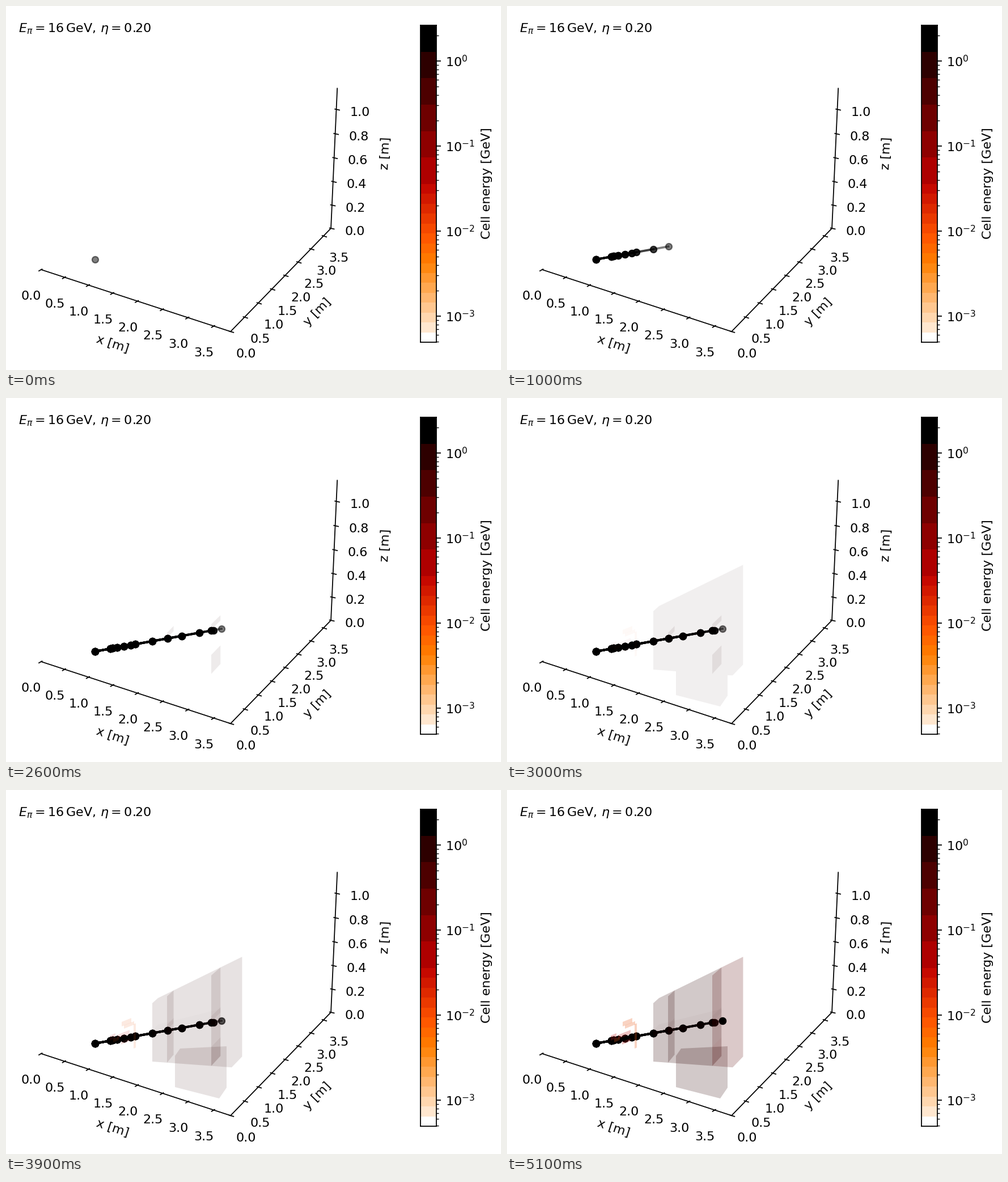
Animation, 873 px wide and 642 px high, one loop 6.1 s. Source, as a matplotlib script:

```python
import numpy as np
import matplotlib.pyplot as plt
from matplotlib.animation import FuncAnimation
from matplotlib.patches import Polygon

W, H, DPI = 873, 642, 160
FRAMES, STEP_MS = 61, 100

plt.rcParams["font.family"] = "DejaVu Sans"
plt.rcParams["font.size"] = 10
plt.rcParams["mathtext.fontset"] = "dejavusans"

fig = plt.figure(figsize=(W / DPI, H / DPI), dpi=DPI, facecolor="white")
ax = fig.add_axes([0, 0, 1, 1])
ax.set_xlim(0, W)
ax.set_ylim(H, 0)
ax.axis("off")

# --- perspective axes -------------------------------------------------
CAMERA = np.array([[81.5, 53.66, -8.5, 62],
                   [19.97, -38.5, -217, 465],
                   [-0.015, 0.017, -0.031, 1]])
X_MAX, Y_MAX, Z_MAX = 3.82, 3.8, 1.17


def project(x, y, z):
    u, v, w = CAMERA @ (x, y, z, 1)
    return np.array([u / w, v / w])


def draw_axis(place, end, step, tick, label_shift):
    """Axis line with ticks; place maps a value to a stage position."""
    ax.plot(*np.transpose([place(0), place(end)]), color="k", lw=0.8)
    tick = np.array(tick)
    for value in np.arange(0, end, step):
        p = place(value)
        ax.plot(*np.transpose([p - tick / 3, p + tick * 2 / 3]), color="k",
                lw=0.8, solid_capstyle="butt")
        ax.text(*(p + label_shift), f"{value:.1f}",
                ha="center", va="center_baseline")


draw_axis(lambda t: project(t, 0, 0), X_MAX, 0.5, (-7, 4), (-17.3, 45.5))
draw_axis(lambda t: project(X_MAX, t, 0), Y_MAX, 0.5, (9.2, 2.8), (27.5, 37.6))
draw_axis(lambda t: project(X_MAX, Y_MAX, t), Z_MAX, 0.2, (9.6, 2.2), (41.7, 3.6))

for name, x, y, angle in (("x", 188, 597, -18), ("y", 549, 540, 46),
                          ("z", 669, 260, 87.5)):
    ax.text(x, y, f"{name} [m]", ha="center", va="center", rotation=angle)

ax.text(22, 46, r"$E_{\pi}=16\,\mathrm{GeV},\,\eta=0.20$")

# --- colour scale -----------------------------------------------------
BAR_L, BAR_R, BAR_T, BAR_B, BAR_MID = 731, 759, 34, 593, 314


def heat(x):
    return tuple(np.clip((1.5 * x, 2 * x - 1, 4 * x - 3), 0, 1))


def energy(y):
    """Energy at a stage height, 150 px per decade."""
    return 10 ** ((97 - y) / 150)


bar = fig.add_axes([BAR_L / W, 1 - BAR_B / H,
                    (BAR_R - BAR_L) / W, (BAR_B - BAR_T) / H])
bar.set_yscale("log")
bar.set_xlim(0, 1)
bar.set_ylim(energy(BAR_B), energy(BAR_T))
bar.set_xticks([])
bar.yaxis.tick_right()

edges = np.round(np.r_[np.linspace(BAR_B, BAR_MID, 17),
                       np.linspace(BAR_MID, BAR_T, 7)[1:]])
shades = np.r_[1, np.linspace(0.953, 0.518, 15), np.linspace(0.455, 0.118, 5), 0]
for low, high, shade in zip(edges[:-1], edges[1:], shades):
    bar.axhspan(energy(low), energy(high), color=heat(shade), lw=0)
ax.text(847.5, 313, "Cell energy [GeV]", rotation=90, ha="center", va="center")

# --- particle track: every pass repeats the path reached so far ---------
hit_x = np.array([157, 184, 188, 195.5, 207.5, 220, 228, 258,
                  284.5, 310, 340.5, 362, 366, 380])
hit_y = 447 - 0.1794 * (hit_x - hit_x[0])

passes = []
for frame in range(21):
    n = int(np.interp(frame, (2, 11, 20), (0, 9, 13))) + 1
    line, = ax.plot(hit_x[:n], hit_y[:n], color="k", lw=1.7, alpha=0.5, zorder=3)
    dots = ax.scatter(hit_x[:n], hit_y[:n], s=25, color="k", lw=1, alpha=0.5,
                      zorder=3)
    passes.append((line, dots))
stop = ax.scatter(hit_x[-1:], hit_y[-1:], s=25, color="k", lw=1, zorder=5)

# --- calorimeter cells --------------------------------------------------
DARK, RED, ORANGE, PINK = (45, 0, 0), (85, 0, 0), (235, 95, 30), (190, 30, 30)
LAYERS = (258, 284, 362, 398)
BOX = [(298, 469), (307, 456), (389, 452), (389, 525), (376, 544), (298, 524)]
cells = []


def front(x, part):
    """Point on the near face; part runs from top (0) to bottom (1)."""
    d = x - LAYERS[0]
    top, bottom = 376 - 0.47 * d, 479 + 0.073 * d
    return x, top + part * (bottom - top)


def back(x, part):
    d = x - LAYERS[0]
    top, bottom = 367 - 0.52 * d, 466 + 0.03 * d
    return x + 10 + 0.06 * d, top + part * (bottom - top)


def slab(left, right, part=0):
    return [front(left, 1), front(left, part), back(left, part),
            back(right, part), back(right, 1), front(right, 1)]


def wall(x, low, high):
    return [front(x, low), back(x, low), back(x, high), front(x, high)]


def chip(x, y, w, h):
    rise = 0.4 * w
    return [(x, y), (x + w, y - rise), (x + w, y - rise + h), (x, y + h)]


def add_cell(points, times, alphas, color, late_color=None):
    patch = Polygon(points, closed=True, lw=0, zorder=4)
    ax.add_patch(patch)
    cells.append((patch, times, alphas, np.array(color) / 255,
                  np.array(late_color or color) / 255))


# common outline that fades while the single cells emerge
add_cell(slab(LAYERS[0], LAYERS[-1]) + [(389, 489)] + BOX[3:] + [(298, 482)],
         (26, 31, 39), (0, 0.08, 0), DARK)

GROW = (31, 39, 51), (0, 0.115, 0.21)
for left, right, late in zip(LAYERS, LAYERS[1:], (DARK, DARK, RED)):
    add_cell(slab(left, right), *GROW, DARK, late)
add_cell(BOX, *GROW, DARK)
add_cell(slab(LAYERS[0], LAYERS[2], 0.47), (31, 51), (0, 0.025), DARK)

# first hits on the walls between layers
FIRST = (24, 26, 31, 51), (0, 0.08, 0.08, 0.03)
add_cell(wall(LAYERS[2], 0.79, 1), *FIRST, DARK, (150, 0, 0))
add_cell(wall(LAYERS[2], 0.45, 0.51), *FIRST, DARK)
add_cell(wall(LAYERS[1], 0.43, 0.51), *FIRST, DARK)

# small cells near the start of the shower
SPARK = (27, 31, 39, 51), (0, 0.04, 0.13, 0.27)
for shape in ((204, 409, 17, 8), (208, 415, 18, 6), (225, 413, 4, 43),
              (189, 439, 10, 6)):
    add_cell(chip(*shape), *SPARK, ORANGE)
for shape in ((183, 433, 10, 9), (196, 432, 22, 7), (203, 444, 15, 5)):
    add_cell(chip(*shape), *SPARK, PINK)


def update(frame):
    for k, artists in enumerate(passes):
        for artist in artists:
            artist.set_visible(k <= frame)
    stop.set_alpha(np.clip((frame - 26) / 25, 0, 1) ** 2)
    warm = np.clip((frame - 39) / 12, 0, 1)
    for patch, times, alphas, early, late in cells:
        alpha = np.interp(frame, times, alphas)
        patch.set_facecolor((*(early + (late - early) * warm), alpha))
    return []


anim = FuncAnimation(fig, update, frames=FRAMES, interval=STEP_MS,
                     init_func=lambda: update(0), repeat=True, repeat_delay=0)
plt.show()
```
